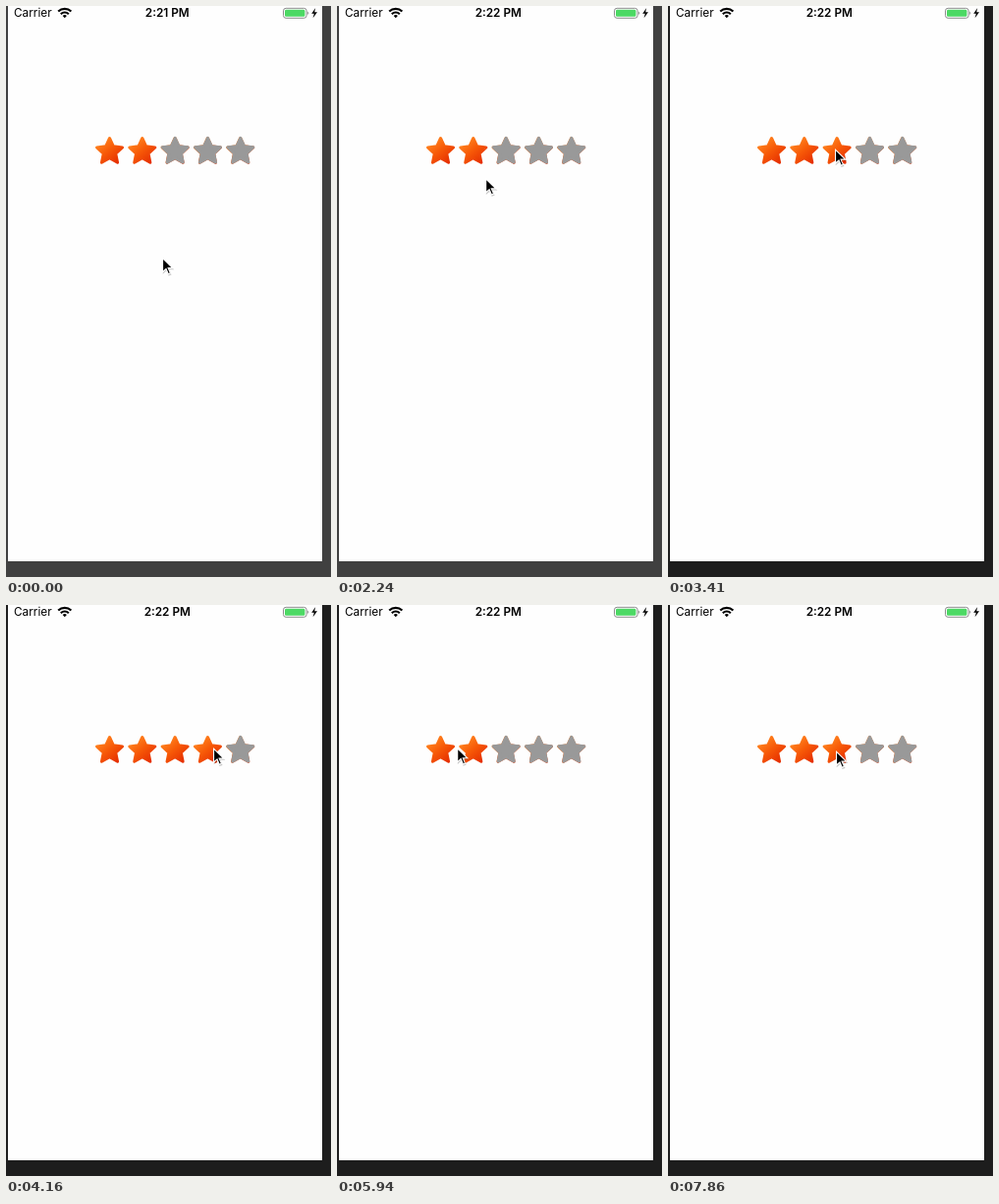
An HTML page for the animation above (8 s loop, 331x581 px).

```html
<!DOCTYPE html>
<html lang="en">
<head>
<meta charset="utf-8">
<title>Star rating</title>
<style>
html, body { margin: 0; width: 100%; height: 100%; overflow: hidden; }
svg { display: block; width: 331px; height: 581px; }
text { font: 11.8px Inter, "Liberation Sans", sans-serif; fill: #000; }
.star { stroke-width: 3; stroke-linejoin: round; }
</style>
</head>
<body>
<svg viewBox="0 0 331 581">
  <defs>
    <linearGradient id="warm" gradientUnits="userSpaceOnUse" x1="-9" y1="-11" x2="9" y2="11">
      <stop offset="0" stop-color="#ff831f"/>
      <stop offset=".45" stop-color="#f75a08"/>
      <stop offset="1" stop-color="#e52e00"/>
    </linearGradient>
  </defs>
  <rect id="desk" width="331" height="581"/>
  <rect x="2" width="320" height="565" fill="#fefefe"/>

  <text x="8" y="11.3">Carrier</text>
  <g fill="none" stroke="#000" stroke-width="2.1">
    <path d="M53.2 5.6A9.3 9.3 0 0 1 66.4 5.6"/>
    <path d="M55.8 8.2A5.6 5.6 0 0 1 63.8 8.2"/>
    <path d="M59.8 12.2L57.7 10.1A3 3 0 0 1 61.9 10.1Z" fill="#000" stroke="none"/>
  </g>
  <text id="clock" x="164.3" y="11.3" text-anchor="middle" style="font-weight:600"></text>
  <rect x="282.5" y="2.3" width="23.6" height="10" rx="2.6" fill="none" stroke="#8c8c8c"/>
  <rect x="284" y="3.8" width="20.4" height="7" rx="1.4" fill="#4cd964"/>
  <path d="M307.2 5.6Q309.4 7.3 307.2 9Z" fill="#8c8c8c"/>
  <path d="M315.2 2L311.2 7.8H313.8L312.6 12.2L317 6.2H314.2Z"/>

  <g id="stars"></g>

  <g id="cursor">
    <path d="M.4 1V16.4L4 13L6.2 18.2L9.2 17L7 11.9H12Z" fill="#000" opacity=".22" transform="translate(.3 .9)"/>
    <path d="M0 0V16.4L3.8 12.8L6 18L9 16.8L6.8 11.7H12Z" fill="#fff"/>
    <path d="M1.1 2.6V13.8L4.2 10.9L6.6 16.6L7.7 16.1L5.3 10.6H9.3Z"/>
  </g>
</svg>
<script>
const LOOP = 8000, START = 450, STEP = 147.9;
const $ = id => document.getElementById(id);

// [from step, to step, x, y, ease-out power, control x, control y]
const home = [159, 255.5];
const moves = [
  [-1, 6, 165, 210.5, 2],
  [10, 17, 170, 145, 1, 130, 136],
  [21, 23, 211, 145, 2],
  [26, 28, 236, 143, 2],
  [30, 34, 136, 142, 2.65],
  [36, 39, 107, 147.5, 1.6],
  [41, 44, 140, 148, 0.78],
  [46, 48, 171, 148, 1.6]
];

// [step, filled stars]
const ratings = [[20, 3], [25, 4], [30, 5], [36, 2], [40, 1], [46, 2], [50, 3]];

function starPath(outer, inner) {
  const pts = Array.from({ length: 10 }, (_, i) => {
    const r = i % 2 ? inner : outer, a = (i / 5 - 0.5) * Math.PI;
    return (r * Math.cos(a)).toFixed(2) + " " + (r * Math.sin(a)).toFixed(2);
  });
  return "M" + pts.join("L") + "Z";
}

const shape = starPath(13.7, 6.6);
$("stars").innerHTML = Array.from({ length: 5 }, (_, i) =>
  `<g transform="translate(${105.5 + i * 33.3} 148.2)">
    <path class="star" d="${shape}" fill="url(#warm)" stroke="url(#warm)"/>
    <path class="star grey" d="${shape}" fill="#999" stroke="#999" transform="translate(.1 -.2)"/>
  </g>`).join("");
const greys = document.querySelectorAll(".grey");

function cursorAt(step) {
  let [x, y] = home;
  for (const [from, to, tx, ty, power, cx = (x + tx) / 2, cy = (y + ty) / 2] of moves) {
    if (step <= from) break;
    const u = Math.min(1, (step - from) / (to - from));
    const p = 1 - (1 - u) ** power, q = 1 - p;
    x = q * q * x + 2 * p * q * cx + p * p * tx;
    y = q * q * y + 2 * p * q * cy + p * p * ty;
  }
  return [x, y];
}

function draw(ms) {
  // the screen refreshes in fixed steps
  const step = Math.max(-1, Math.floor((ms - START) / STEP));
  const rating = ratings.reduce((n, [at, stars]) => step >= at ? stars : n, 2);
  const [x, y] = cursorAt(step);
  greys.forEach((g, i) => g.setAttribute("visibility", i < rating ? "hidden" : "visible"));
  $("cursor").setAttribute("transform", `translate(${x.toFixed(2)} ${y.toFixed(2)})`);
  $("clock").textContent = step < 8 ? "2:21 PM" : "2:22 PM";
  $("desk").setAttribute("fill", step < 20 ? "#404040" : "#1d1d1d");
}

function tick() {
  draw(performance.now() % LOOP);
  requestAnimationFrame(tick);
}
tick();
</script>
</body>
</html>
```
